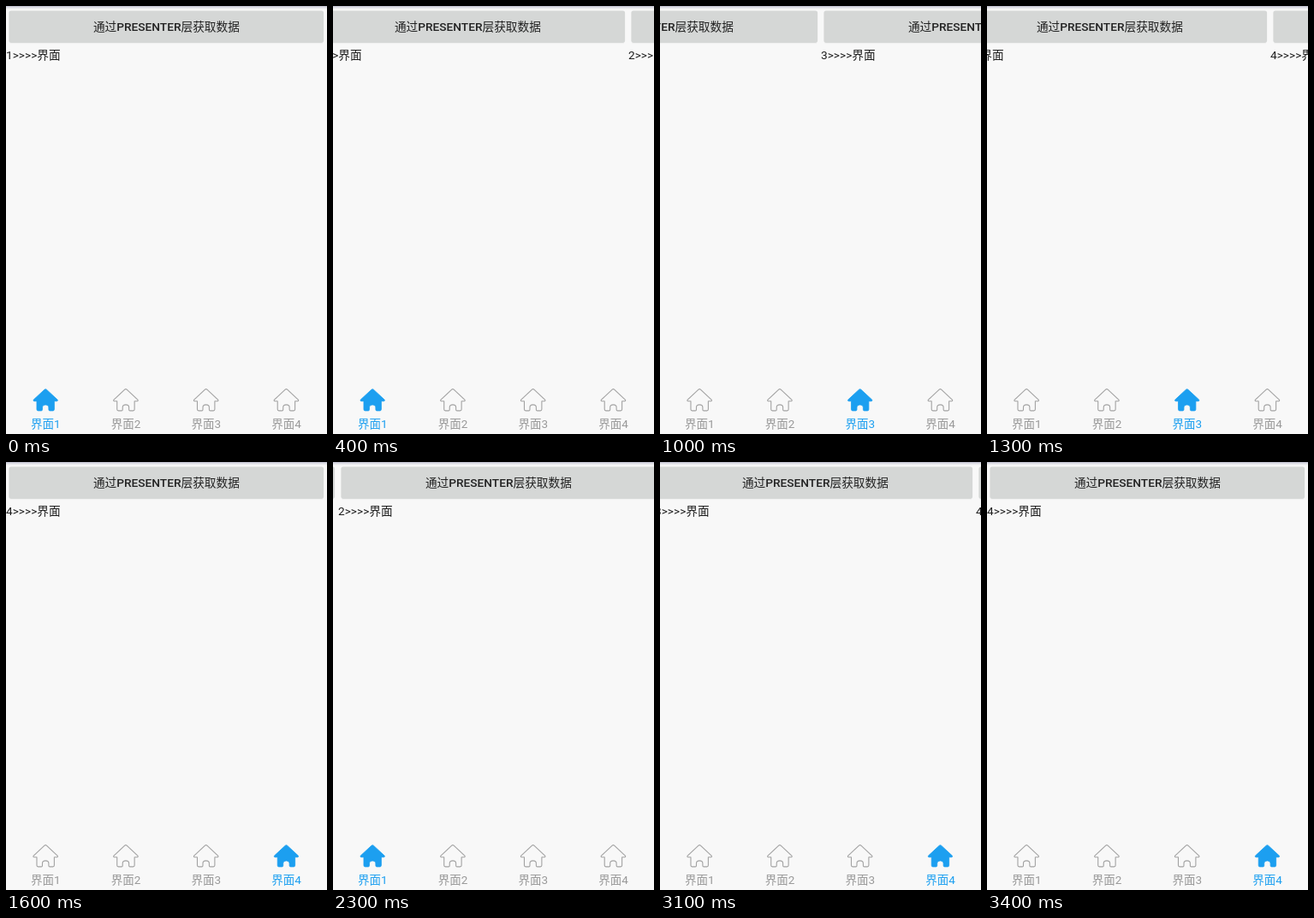
An HTML page that plays this animation: 375 by 499 pixels, repeating every 3900 ms.

```html
<!DOCTYPE html>
<html lang="zh-CN">
<head>
<meta charset="utf-8">
<title>Pager</title>
<style>
  html, body { margin: 0; width: 100%; height: 100%; overflow: hidden; background: #f8f8f8; }
  svg { display: block; width: 375px; height: 499px; }
  text { font: 13.7px Roboto, "Noto Sans CJK SC", "Noto Sans CJK", sans-serif; }
  .button { fill: #d5d7d6; }
  .caption { font-weight: 500; fill: #222; text-anchor: middle; }
  .body { fill: #1c1c1c; }
  .tab text { font-size: 13.5px; fill: #999; text-anchor: middle; }
  .tab path { fill: none; stroke: #a2a2a2; stroke-width: 1.1; stroke-linejoin: round; }
  .tab.active text { fill: #1c9ff0; }
  .tab.active path { fill: #1c9ff0; stroke: #1c9ff0; stroke-width: .8; }
</style>
</head>
<body>
<svg viewBox="0 0 375 499">
  <defs>
    <linearGradient id="edge" x2="0" y2="1">
      <stop offset="0" stop-color="#b6b6c6"/>
      <stop offset=".4" stop-color="#dedee6"/>
      <stop offset="1" stop-color="#f8f8f8"/>
    </linearGradient>
  </defs>
  <rect width="375" height="499" fill="#f8f8f8"/>
  <rect width="375" height="4" fill="url(#edge)"/>
  <g id="pages"></g>
  <g id="tabs"></g>
</svg>
<script>
const WIDTH = 375, LOOP = 3900, STEP = 100;
const HOUSE = 'M-1.2 .7Q0 -.4 1.2 .7L14 12.6Q14.8 13.9 13.2 14.2H10.2V23.8' +
  'Q10.2 25.4 8.6 25.4H5Q3.7 25.4 3.7 24V21.4Q3.7 18.4 0 18.4' +
  'T-3.7 21.4V24Q-3.7 25.4 -5 25.4H-8.6Q-10.2 25.4 -10.2 23.8V14.2H-13.2Q-14.8 13.9 -14 12.6Z';

const pages = document.getElementById('pages');
const tabs = document.getElementById('tabs');
for (let n = 1; n <= 4; n++) {
  pages.innerHTML += `<g>
    <rect class="button" x="3.4" y="5.6" width="367.7" height="37.2" rx="2.5"/>
    <rect x="4.5" y="42.6" width="365.5" height=".8" fill="#000" opacity=".07"/>
    <text class="caption" x="187.4" y="29">通过PRESENTER层获取数据</text>
    <text class="body" x="0" y="62">${n}&gt;&gt;&gt;&gt;界面</text></g>`;
  tabs.innerHTML += `<g class="tab" transform="translate(${(n - 0.5) * WIDTH / 4 - 0.7} 446.5)">
    <path d="${HOUSE}"/><text y="45.5">界面${n}</text></g>`;
}

const clamp = v => Math.min(1, Math.max(0, v));
const settle = v => 1 - (1 - clamp(v)) ** 5;

// A finger drag over half a page, then a fling to the next page.
const swipe = ms => ms < 170 ? 0.5 * clamp(ms / 170) ** 1.5 : 0.5 + 0.5 * settle((ms - 170) / 265);
const jump = ms => 3 * settle(ms / 400);

function position(t) {
  return swipe(t - 350) + swipe(t - 830) + swipe(t - 1235) - jump(t - 2220) + jump(t - 3020);
}

function selectedTab(t) {
  if (t >= 3100) return 3;
  if (t >= 2300) return 0;
  return Math.floor(position(t) + 0.52);
}

function render(now) {
  const t = Math.floor(now % LOOP / STEP) * STEP;
  const scroll = Math.ceil(position(t) * WIDTH - 0.5);
  const selected = selectedTab(t);
  [...pages.children].forEach((page, i) =>
    page.setAttribute('transform', `translate(${i * WIDTH - scroll} 0)`));
  [...tabs.children].forEach((tab, i) => tab.classList.toggle('active', i === selected));
}

const start = performance.now();
function tick() {
  render(performance.now() - start);
  requestAnimationFrame(tick);
}
tick();
</script>
</body>
</html>
```
